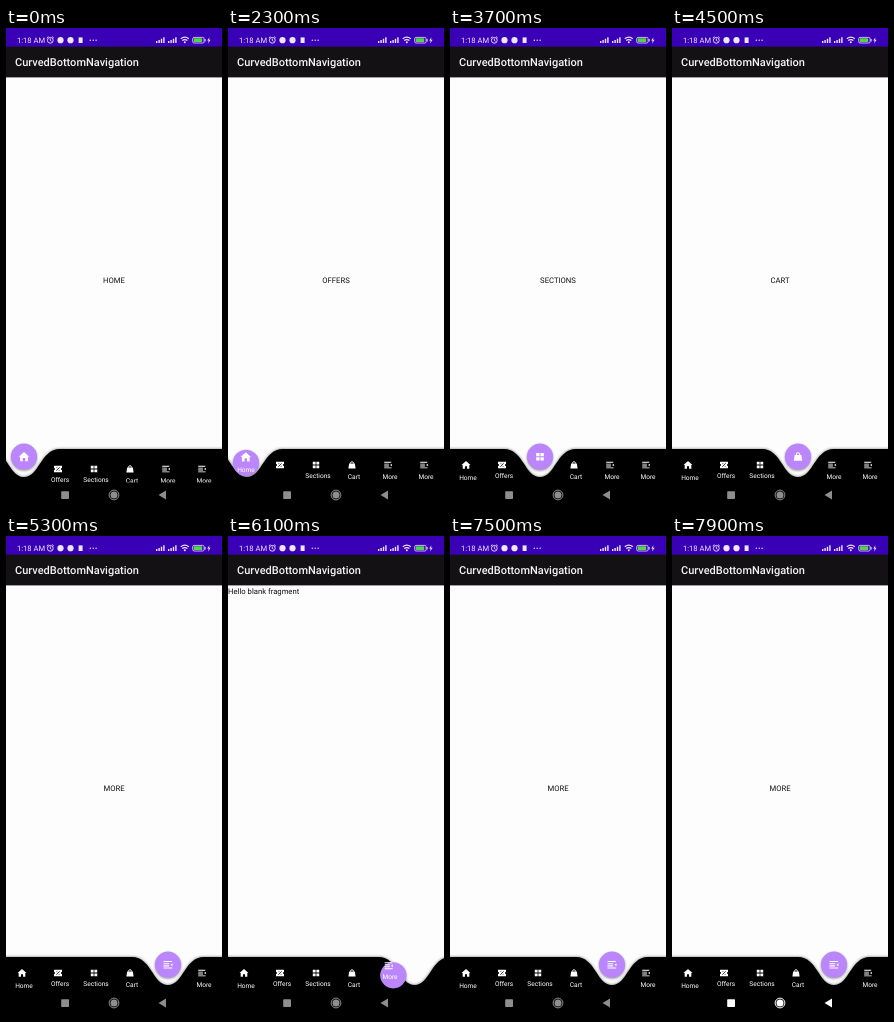
Animation, 216 px wide and 480 px high, one loop 8000 ms. Source, as an HTML page:

```html
<!DOCTYPE html>
<html lang="en">
<head>
<meta charset="utf-8">
<title>Curved bottom navigation</title>
<style>
  html, body { margin: 0; width: 100%; height: 100%; overflow: hidden; background: #fefdfe; }
  svg { display: block; width: 100%; height: 100%; font-family: Roboto, sans-serif; text-rendering: geometricPrecision; }
  #page { font-size: 7.7px; fill: #111; }
  #bar { filter: drop-shadow(0 0 1.5px rgba(0, 0, 0, .55)); }
  #fab { filter: drop-shadow(0 1px 1.2px rgba(0, 0, 0, .4)); }
  #items { font-size: 6.6px; fill: #fff; text-anchor: middle; }
</style>
</head>
<body>
<svg viewBox="0 0 216 480">
  <defs>
    <clipPath id="barClip"><rect y="400" width="216" height="54.5"/></clipPath>
    <g id="home"><path d="M0-4.2L4.7 0H3.5V4H1.1V1.2H-1.1V4H-3.5V0H-4.7Z"/></g>
    <g id="offers">
      <path d="M-4.2-3.3H4.2V-1.1A1.1 1.1 0 0 0 4.2 1.1V3.3H-4.2V1.1A1.1 1.1 0 0 0-4.2-1.1Z"/>
      <path d="M-1.7 1.8L1.7-1.8M-1.6-1.4h.9M.7 1.4h.9" stroke="#000" stroke-width=".8"/>
    </g>
    <g id="sections"><path d="M-3.4-3.4h3v3h-3zM.4-3.4h3v3h-3zM-3.4.4h3v3h-3zM.4.4h3v3h-3z"/></g>
    <g id="cart">
      <path d="M-3-1.6H3L3.8 3.7H-3.8Z"/>
      <path d="M-1.5-1.4V-2A1.5 1.5 0 0 1 1.5-2V-1.4" fill="none" stroke="#fff" stroke-width=".9"/>
    </g>
    <g id="more"><path d="M-4-3.4H3.4v1H-4zM-4-1.4H1v.9H-4zM-4 .6H1v.9H-4zM-4 2.5H3.8v1H-4zM4-1.2V1.4L2.2 .1Z"/></g>
  </defs>

  <rect width="216" height="480" fill="#fefdfe"/>
  <rect width="216" height="49.4" fill="#141114"/>
  <rect width="216" height="18.6" fill="#3a00b6"/>
  <text x="9" y="38.3" font-size="11" font-weight="500" fill="#f4f4f4">CurvedBottomNavigation</text>

  <g fill="#ece6fa">
    <text x="11" y="15" font-size="7.6">1:18 AM</text>
    <g fill="none" stroke="#ece6fa" stroke-width=".9">
      <circle cx="44.3" cy="12.3" r="2.9"/>
      <path d="M44.3 10.5v2l1.3.8M40.8 10l1.6-1.4M47.8 10l-1.6-1.4"/>
      <path d="M174.8 10.8q4-3.2 8 0M176.2 12.6q2.6-2 5.2 0" stroke-width="1.2"/>
      <rect x="186.7" y="9.4" width="11.4" height="5.6" rx="1.4" stroke-width=".8"/>
    </g>
    <circle cx="54.5" cy="12.2" r="3.1"/>
    <circle cx="64.5" cy="12.2" r="3.1"/>
    <rect x="72.6" y="9.4" width="4" height="5.6"/>
    <circle cx="84.3" cy="12.3" r=".7"/><circle cx="87.2" cy="12.3" r=".7"/><circle cx="90.1" cy="12.3" r=".7"/>
    <path id="signal" d="M150 13h1.4v2h-1.4zM152.4 12h1.4v3h-1.4zM154.8 10.7h1.4v4.3h-1.4zM157.2 9.3h1.4v5.7h-1.4z"/>
    <use href="#signal" x="12"/>
    <circle cx="178.8" cy="14.3" r="1"/>
    <rect x="187.7" y="10.3" width="8.5" height="3.8" rx=".6" fill="#55d24b"/>
    <path d="M198.6 11h1v2.4h-1zM203.5 9.2l-2.3 3.4h1.5l-.6 2.8 2.5-3.6h-1.6z"/>
  </g>

  <text id="page"></text>
  <path id="bar"/>
  <circle id="fab" r="13.1" fill="#bb86fc"/>
  <g id="items" clip-path="url(#barClip)"></g>
  <use id="fabIcon" fill="#fff"/>

  <g id="system" stroke-width="0">
    <rect x="55.2" y="463.2" width="7.8" height="7.8" rx=".7"/>
    <circle cx="108" cy="467" r="3.5"/>
    <circle cx="108" cy="467" r="4.9" fill="none" stroke-width="1"/>
    <path d="M152.5 467L160 462.6V471.4Z"/>
  </g>
</svg>
<script>
const LOOP = 8000, STEP = 100, SLIDE = 300;
const TOP = 421, DIP = 449, R = 15.4, FAB_Y = 428.7, FAB_ICON = 1.12;

const items = [
  { icon: 'home', label: 'Home', base: 451.6 },
  { icon: 'offers', label: 'Offers', base: 449.9 },
  { icon: 'sections', label: 'Sections', base: 449.7 },
  { icon: 'cart', label: 'Cart', base: 450.6 },
  { icon: 'more', label: 'More', base: 450.6 },
  { icon: 'more', label: 'More', base: 450.6 }
];
const pages = ['HOME', 'OFFERS', 'SECTIONS', 'CART', 'MORE', 'Hello blank fragment'];
// `lead` is how far the slide has come when it is first visible
const taps = [
  { at: 2300, to: 1, lead: .1 },
  { at: 3500, to: 2, lead: .4 },
  { at: 4300, to: 3, lead: .4 },
  { at: 5100, to: 4, lead: .4 },
  { at: 6100, to: 5, lead: .62 },
  { at: 7300, to: 4, lead: .4 }
];

const $ = id => document.getElementById(id);
const set = (el, attrs) => { for (const k in attrs) el.setAttribute(k, attrs[k]); };
const add = (parent, tag) => parent.appendChild(document.createElementNS('http://www.w3.org/2000/svg', tag));
const clamp = v => Math.min(1, Math.max(0, v));
const mix = (a, b, p) => a + (b - a) * p;
const itemX = i => 18 + 36 * i;
const show = (el, on) => { el.style.display = on ? '' : 'none'; };
const place = (x, y, scale) => `translate(${x} ${y}) scale(${scale})`;

items.forEach(item => {
  item.iconEl = add($('items'), 'use');
  set(item.iconEl, { href: '#' + item.icon });
  item.labelEl = add($('items'), 'text');
  item.labelEl.textContent = item.label;
});

function barPath(c) {
  const edge = R * 7 / 3, bend = R * 13 / 12;
  return `M-60 ${TOP}H${c - edge}C${c - bend} ${TOP} ${c - R} ${DIP} ${c} ${DIP}` +
    `S${c + bend} ${TOP} ${c + edge} ${TOP}H280V490H-60Z`;
}

function stateAt(t) {
  let from = 0, to = 0, s = 1;
  for (const tap of taps) {
    if (t < tap.at) break;
    from = to;
    to = tap.to;
    s = clamp(tap.lead + (t - tap.at) / SLIDE);
  }
  return { from, to, s };
}

function draw(t) {
  const { from, to, s } = stateAt(t);
  const glide = (1 - Math.cos(Math.PI * s)) / 2;
  const late = s ** 5;
  const moving = s < 1;

  const page = $('page'), blank = to === 5;
  page.textContent = pages[to];
  set(page, { x: blank ? 0 : 108, y: blank ? 57.8 : 254.8, 'text-anchor': blank ? 'start' : 'middle' });

  set($('bar'), { d: barPath(mix(itemX(from), itemX(to), glide)) });
  const fabX = mix(itemX(from), itemX(to), late);
  const fabY = FAB_Y + (moving ? 11 * Math.sqrt(Math.sin(Math.PI * s)) : 0);
  set($('fab'), { cx: fabX, cy: fabY });

  show($('fabIcon'), s > .85);
  set($('fabIcon'), { href: '#' + items[to].icon, transform: place(fabX, fabY, FAB_ICON) });

  const intro = t < 200 ? 4 : t < 300 ? 2 : 0;
  items.forEach((item, i) => {
    const leaving = moving && i === from;
    const y = intro + (leaving ? -8 * (1 - late) : 0);
    const settle = leaving ? s : 1;
    set(item.iconEl, { transform: place(itemX(i) - 2 * settle, 437 + y, mix(FAB_ICON, .95, settle)) });
    set(item.labelEl, { x: itemX(i), y: item.base + y });
    show(item.iconEl, i !== to || s < .4);
    show(item.labelEl, i !== to);
  });

  const grey = Math.round(mix(142, 255, clamp((t - 7500) / 300)));
  const tone = `rgb(${grey},${grey},${grey})`;
  set($('system'), { fill: tone, stroke: tone });
}

const start = performance.now();
function tick() {
  const t = (performance.now() - start) % LOOP;
  draw(Math.floor(t / STEP) * STEP);
  requestAnimationFrame(tick);
}
tick();
</script>
</body>
</html>
```
